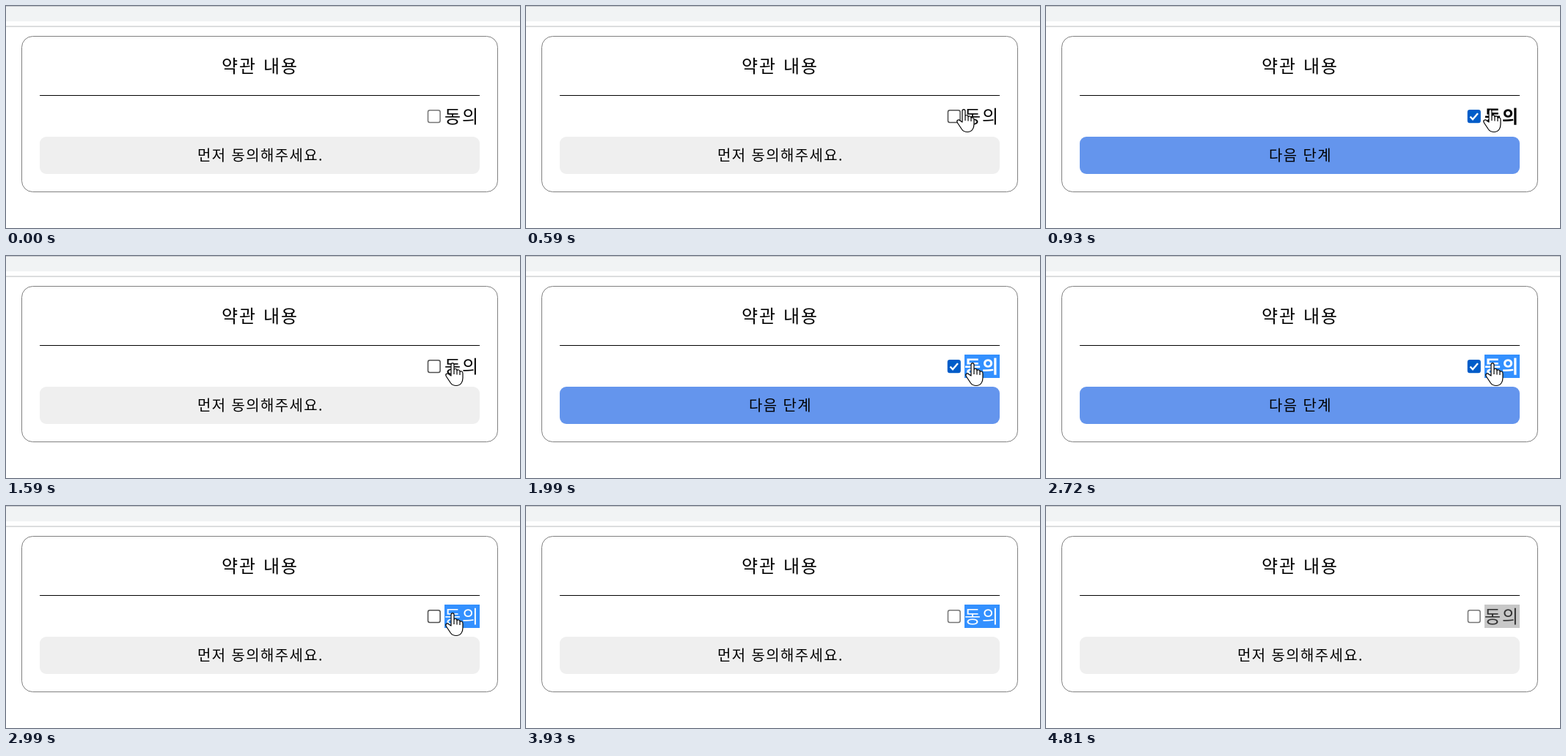
Animation of 701 by 304 pixels, one loop 4880 ms. Source, as an HTML page:

```html
<!DOCTYPE html>
<html lang="ko">
<head>
<meta charset="utf-8">
<style>
  html, body { margin: 0; width: 100%; height: 100%; overflow: hidden; background: #fff; }
  svg { display: block; width: 701px; height: 304px; }
  text { font-family: 'Noto Sans CJK KR', 'Noto Sans CJK', sans-serif; font-size: 24px; letter-spacing: 2px; }
  #action { font-size: 20px; font-weight: 350; letter-spacing: 1.35px; text-anchor: middle; }
</style>
</head>
<body>
<svg viewBox="0 0 701 304">
  <rect width="701" height="21" fill="#f1f3f4"/>
  <rect width="701" height="1" fill="#c6c8cb"/>
  <rect y="27" width="701" height="2" fill="#dcddde"/>
  <rect x="21.5" y="41.5" width="649" height="213" rx="15" fill="#fff" stroke="#808080"/>
  <text x="294" y="91">약관 내용</text>
  <rect x="46" y="122" width="600" height="1"/>
  <rect id="selection" x="598" y="135" width="48" height="32"/>
  <text id="label" x="598" y="160">동의</text>
  <rect id="box" x="575.5" y="142.8" width="16.6" height="16.6" rx="2.5" stroke-width="1.5"/>
  <path id="tick" d="M578.5 151.5l3.5 3.7 7-8.2" fill="none" stroke="#fff" stroke-width="2.4"/>
  <rect id="button" x="46" y="179" width="600" height="51" rx="9"/>
  <text id="action" x="347" y="212"></text>
  <g id="cursor" fill="#fff" stroke="#000" stroke-width="1.2" stroke-linejoin="round">
    <path id="hand" d="M-2 18V3Q-2 .6 0 .6T2 3V10Q2 8.5 4 8.5T6 11Q6.5 9.7 8.3 10T10 12.5Q10.8 11.5 12.5 12T14 15V21Q14 25 12 28Q9.500 31.500 5 31.500Q0 31.500-2.500 28L-8.500 19Q-10 16.500-8.300 15.300T-5 16ZM2 10V16M6 11V16.500M10 13V17"/>
    <path id="arrow" d="M.5 .8V19.500L4.800 15.400 7.800 22.500 11 21.200 8 14.300H14Z"/>
  </g>
</svg>
<script>
  const el = id => document.getElementById(id);
  const LOOP = 4880;
  const toggles = [930, 1590, 1990, 2320, 2720, 2990];
  const presses = [[1460, 1590], [1860, 1990], [2190, 2320], [2590, 2720], [2920, 2990]];
  const mix = (a, b, p) => a + (b - a) * p;
  const stepped = (t, start, end, count) =>
    Math.floor((t - start) / (end - start) * count + 1e-6) / count;
  const show = (id, on) => el(id).setAttribute('visibility', on ? 'visible' : 'hidden');
  const fill = (id, color) => el(id).setAttribute('fill', color);

  // Position of the cursor's hot spot, or null while it is away.
  function cursorAt(t) {
    if (t < 70 || t >= 3930) return null;
    if (t < 590) {
      const p = stepped(t, 70, 590, 8);
      return [mix(602, 597, p), mix(266, 141, 1 - (1 - p) ** 2)];
    }
    if (t < 790) return [597, 141];
    if (t < 930) return [608, 122];
    if (t < 1130) {
      const p = stepped(t, 930, 1130, 3);
      return [mix(606, 609, p), mix(141, 146, p)];
    }
    if (t < 3450) return [609, 146];
    const p = (stepped(t, 3450, 3930, 7) * 7 + 1) / 8;
    return [609, mix(146, 304, p ** 1.3)];
  }

  function draw(t) {
    const checked = toggles.filter(at => t >= at).length % 2 === 1;
    const pressed = presses.some(([from, to]) => t >= from && t < to);
    const selected = t >= 1860;
    const faded = t >= 4810;
    const point = cursorAt(t);
    const hover = point !== null && point[1] < 169;

    show('selection', selected);
    fill('selection', faded ? '#c8c8c8' : '#3390ff');
    fill('label', !selected ? '#000' : faded ? '#323232' : '#fff');
    el('label').setAttribute('font-weight', checked ? 700 : 400);

    const boxColor = checked
      ? (pressed ? '#3793ff' : hover ? '#005cc8' : '#0075ff')
      : (pressed ? '#8d8d8d' : hover ? '#4f4f4f' : '#767676');
    fill('box', checked ? boxColor : '#fff');
    el('box').setAttribute('stroke', boxColor);
    show('tick', checked);

    fill('button', checked ? '#6495ed' : '#efefef');
    el('action').textContent = checked ? '다음 단계' : '먼저 동의해주세요.';

    show('hand', hover);
    show('arrow', point && !hover);
    if (point) el('cursor').setAttribute('transform', `translate(${point})`);
  }

  const start = performance.now();
  function tick() {
    draw((performance.now() - start) % LOOP);
    requestAnimationFrame(tick);
  }
  tick();
</script>
</body>
</html>
```
